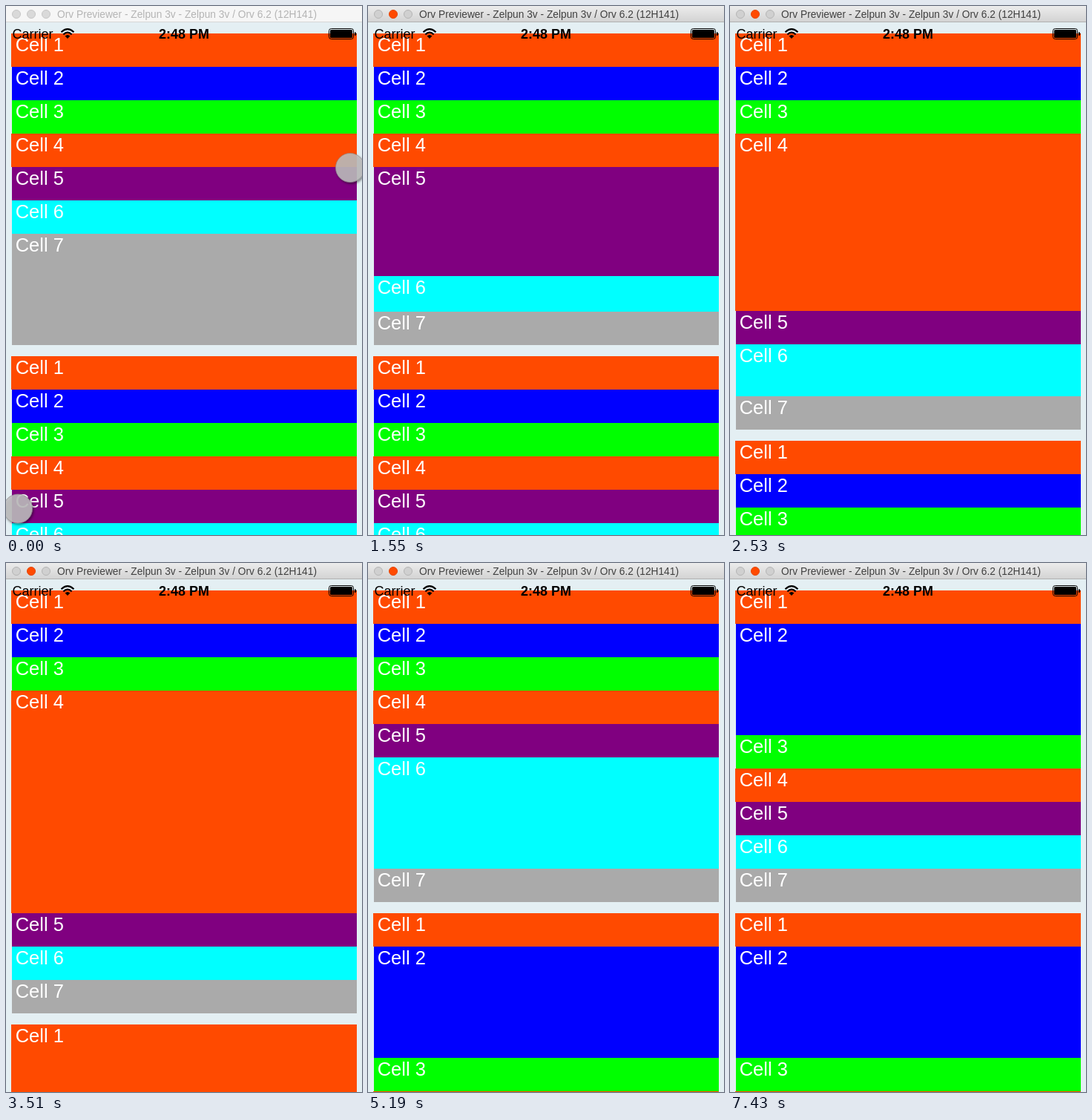
Recreate the animation shown at these times as an HTML page. Size 480 by 713 pixels, loop 8000 ms.

```html
<!DOCTYPE html>
<html lang="en">
<head>
<meta charset="utf-8">
<title>Accordion cells</title>
<style>
  html, body { margin: 0; width: 100%; height: 100%; overflow: hidden; }
  body { position: relative; background: #e4eff3; font-family: "Liberation Sans", Arial, sans-serif; }
  #list { position: absolute; left: 7px; top: 37px; width: 466px; }
  .group { margin-bottom: 15px; }
  .cell {
    box-sizing: border-box; margin: 0 .5px; padding-left: 5.2px; overflow: hidden;
    color: #fff; font-size: 25.5px; line-height: 31px; white-space: nowrap;
  }
  .cell:nth-child(3n + 1):not(:last-child) { margin: 0; padding-left: 5.7px; }
  svg { position: absolute; left: 0; top: 0; width: 480px; height: 713px; }
  .status { font-size: 18px; }
  .title { font-size: 13.75px; fill: #b4b4b4; }
  .bar { fill: #f6f6f6; }
  .edge { fill: #d6d6d6; }
  .light { fill: #d9d9d9; stroke: #c6c6c6; }
  .active .title { fill: #404040; }
  .active .bar { fill: url(#metal); }
  .active .edge { fill: #b1b1b1; }
  .active .light { fill: #d0d0d0; stroke: #b5b5b5; }
  .active .light.mid { fill: #ff4a00; stroke: #e64400; }
  .touch { fill: #bebebe; fill-opacity: .86; stroke: #8c8c8c; stroke-opacity: .7; filter: url(#shade); }
</style>
</head>
<body>
<div id="list"></div>

<svg viewBox="0 0 480 713">
  <defs>
    <linearGradient id="metal" x2="0" y2="1">
      <stop stop-color="#ececec"/><stop offset="1" stop-color="#d2d2d2"/>
    </linearGradient>
    <filter id="shade" x="-30%" y="-30%" width="160%" height="160%">
      <feDropShadow dx="1.5" dy="2" stdDeviation="1.8" flood-color="#000" flood-opacity=".5"/>
    </filter>
  </defs>

  <g id="window">
    <rect class="bar" width="480" height="22"/>
    <rect class="edge" y="21" width="480" height="1"/>
    <circle class="light" cx="14" cy="11" r="5.5"/>
    <circle class="light mid" cx="34" cy="11" r="5.5"/>
    <circle class="light" cx="54" cy="11" r="5.5"/>
    <text class="title" x="69" y="16">Orv Previewer - Zelpun 3v - Zelpun 3v / Orv 6.2 (12H141)</text>
  </g>

  <g class="status">
    <text x="8.5" y="44">Carrier</text>
    <text x="240" y="44" text-anchor="middle" font-weight="700">2:48 PM</text>
    <path d="M74.5 35.2Q83 27.2 91.5 35.2M77.4 38.4Q83 33 88.6 38.4" fill="none" stroke="#000" stroke-width="2.2"/>
    <path d="M79.6 40.5Q83 37.4 86.4 40.5L83 44Z"/>
    <rect x="435.5" y="30.5" width="33" height="14" rx="3" fill="none" stroke="#000"/>
    <rect x="437" y="32" width="30" height="11" rx="1.5"/>
    <path d="M470 35q2.4 0 2.4 2.5t-2.4 2.5z"/>
  </g>

  <g id="touches">
    <circle class="touch" cx="464" cy="218" r="19.5"/>
    <circle class="touch" cx="16" cy="677.5" r="19.5"/>
  </g>
</svg>

<script>
  const LOOP = 8000, TICK = 70, CLOSED = 45;
  const COLORS = ['#ff4a00', '#00f', '#0f0', '#ff4a00', '#800080', '#0ff', '#aaa'];
  const EASE = [.029, .32, .76, .995, 1];   // ease-in-out, one value per tick

  // For each group: [start time, number of the cell that opens]
  const TAPS = [
    [[640, 5], [1550, 6], [2390, 4], [4910, 6], [6240, 3], [7150, 2]],
    [[3370, 1], [4210, 2]]
  ];
  const openHeight = (group, cell) => group === 0 && cell === 4 ? 300 : 150;

  const byId = id => document.getElementById(id);
  const touches = byId('touches');
  const win = byId('window');

  const groups = TAPS.map(() => {
    const box = document.createElement('div');
    box.className = 'group';
    byId('list').append(box);
    return COLORS.map((color, i) => {
      const cell = document.createElement('div');
      cell.className = 'cell';
      cell.style.background = color;
      cell.textContent = `Cell ${i + 1}`;
      box.append(cell);
      return cell;
    });
  });

  function progress(time, start) {
    const tick = Math.floor((time - start) / TICK);
    return EASE[Math.min(tick, EASE.length - 1)];
  }

  function layout(cells, group, time) {
    let from = 7, to = 7, p = 1;
    for (const [start, cell] of TAPS[group]) {
      if (time < start) break;
      from = to;
      to = cell;
      p = progress(time, start);
    }
    cells.forEach((el, i) => {
      const n = i + 1;
      const share = (n === to ? p : 0) + (n === from ? 1 - p : 0);
      el.style.height = CLOSED + (openHeight(group, n) - CLOSED) * share + 'px';
    });
  }

  function draw(now) {
    const time = now % LOOP;
    groups.forEach((cells, g) => layout(cells, g, time));
    touches.style.display = time < 500 ? '' : 'none';
    win.classList.toggle('active', time >= 570);
    requestAnimationFrame(draw);
  }
  draw(0);
</script>
</body>
</html>
```
